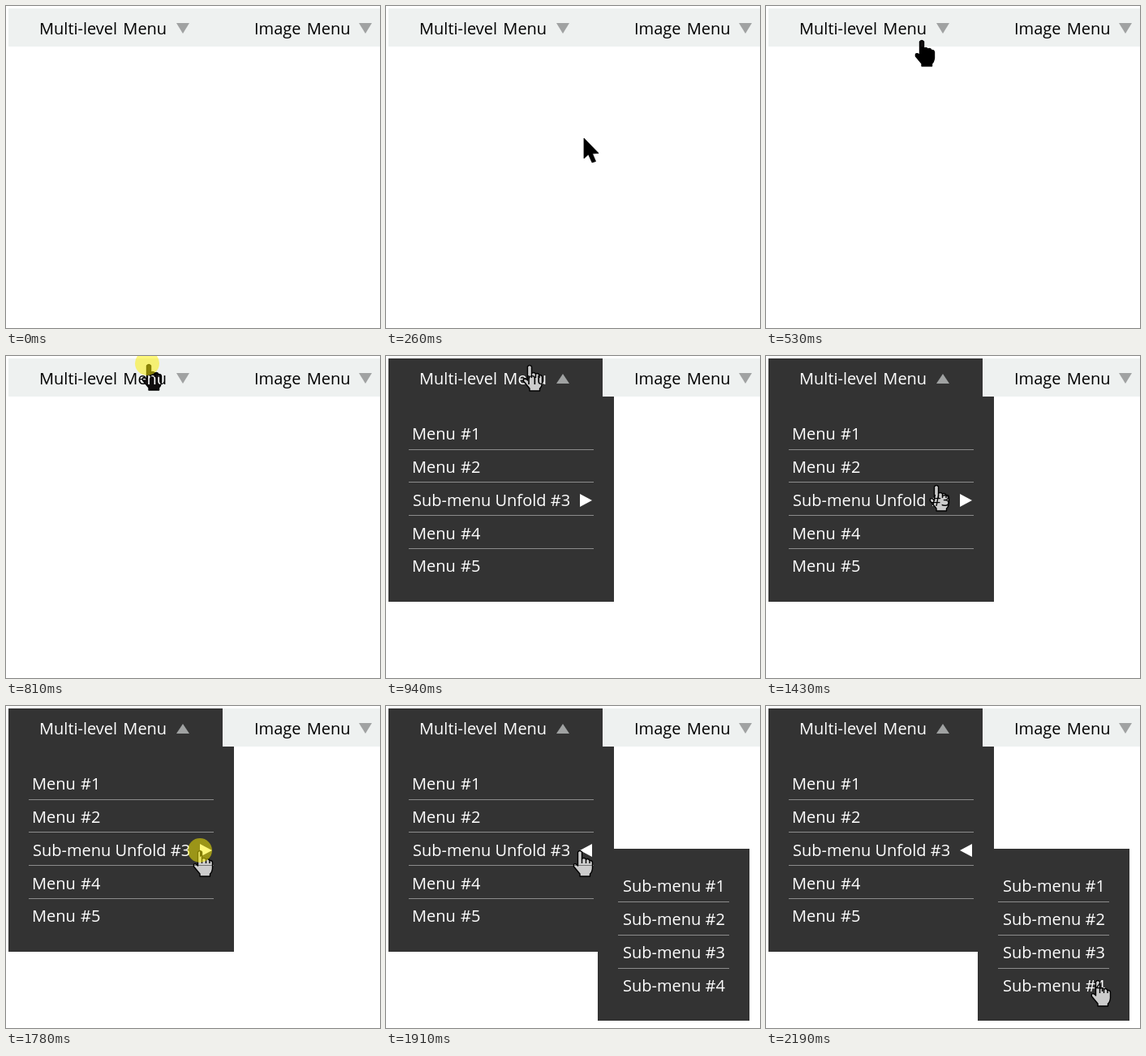
Write an HTML page with a canvas that moves like this. It is 461 px wide and 397 px high and loops after 2.26 s.

```html
<!DOCTYPE html>
<html lang="en">
<head>
<meta charset="utf-8">
<title>Menu demo</title>
<style>
html, body { margin: 0; width: 100%; height: 100%; overflow: hidden; background: #fff; }
canvas { display: block; width: 461px; height: 397px; }
</style>
</head>
<body>
<canvas id="stage" width="461" height="397"></canvas>
<script>
const ctx = document.getElementById('stage').getContext('2d');
const LOOP = 2260;
const DARK = '#333', GREY = '#a0a2a2';
const OPEN_MENU = 940, OPEN_SUB = 1910;

// Screen refresh times: 70 ms apart, with a few exceptions.
const holds = { 0: 120, 260: 60, 810: 130, 1780: 130 };
const ticks = [];
for (let t = 0; t < LOOP; t += holds[t] || 70) ticks.push(t);

// Cursor path: time, x, y.
const path = [
  [120, 282, 256], [260, 244, 163], [390, 211, 85], [600, 182, 20],
  [740, 175, 10], [940, 177, 11], [1010, 181, 21], [1150, 195, 53],
  [1290, 200, 117], [1430, 210, 159], [1570, 225, 172], [1710, 239, 178],
  [1910, 239, 178], [2190, 409, 338]
];

const arrow = new Path2D('M0 0V25L5.5 20L10 30L14.5 28.5L10.5 19L18 18.5Z');
const hand = new Path2D('M-2.5 2Q0 -1 2.5 2V10Q6 8.5 7.5 11Q10.5 9.5 12 12.5Q15 12 15.5 15V22' +
  'Q15 27 12.5 29V32H0V29L-7.5 20Q-8.5 15.5 -4.5 17L-2.5 19Z');
const knuckles = new Path2D('M2.5 10V16M7.5 11V16M12 12.5V16');

function cursorAt(t) {
  const i = path.findIndex(p => p[0] >= t);
  if (i < 0) return path[path.length - 1].slice(1);
  if (i === 0) return path[0].slice(1);
  const [t0, x0, y0] = path[i - 1], [t1, x1, y1] = path[i];
  let k = (t - t0) / (t1 - t0);
  if (t0 >= OPEN_SUB) k = k * k * (3 - 2 * k);
  return [x0 + (x1 - x0) * k, y0 + (y1 - y0) * k];
}

function box(x, y, w, h, color) {
  ctx.fillStyle = color;
  ctx.fillRect(x, y, w, h);
}

function label(text, x, y, color, gap = 0) {
  ctx.font = '20px "Open Sans", "Noto Sans", sans-serif';
  ctx.wordSpacing = gap + 'px';
  ctx.fillStyle = color;
  ctx.fillText(text, x, y);
}

function triangle(color, ...p) {
  ctx.fillStyle = color;
  ctx.beginPath();
  ctx.moveTo(p[0], p[1]);
  ctx.lineTo(p[2], p[3]);
  ctx.lineTo(p[4], p[5]);
  ctx.fill();
}

function drawBar(open) {
  box(3, 3, 458, 47, '#eef1f0');
  if (open) {
    box(3, 3, 264, 47, DARK);
    triangle(GREY, 210, 34, 226, 34, 218, 22);
  } else {
    triangle(GREY, 210, 21, 226, 21, 218, 34);
  }
  triangle(GREY, 435, 21, 451, 21, 443, 34);
  label('Multi-level Menu', 41, 35, open ? '#fff' : '#000', 2);
  label('Image Menu', 306, 35, '#000', 2);
}

function drawMenu(subOpen) {
  box(3, 50, 278, 253, DARK);
  [103, 144, 185, 226, 266].forEach((y, i) => {
    if (i === 2) label('Sub-menu Unfold #3', 33, y, '#fff');
    else label('Menu #' + (i + 1), 32, y, '#fff', 1);
  });
  for (const y of [115, 155, 196, 237]) box(28, y, 228, 1, '#8c8c8c');
  if (subOpen) triangle('#fff', 254, 170, 254, 186, 239, 178);
  else triangle('#fff', 239, 170, 239, 186, 254, 178);
}

function drawSub() {
  box(261, 176, 187, 212, DARK);
  for (let i = 0; i < 4; i++) {
    label('Sub-menu #' + (i + 1), 292, 229 + 41 * i, '#fff');
    if (i < 3) box(286, 241 + 41 * i, 137, 1, '#8c8c8c');
  }
}

// The pointer inverts whatever lies under it.
function drawCursor(x, y, pointing) {
  const shape = pointing ? hand : arrow;
  ctx.save();
  ctx.translate(x, y);
  ctx.globalCompositeOperation = 'difference';
  ctx.fillStyle = '#fff';
  ctx.fill(shape);
  ctx.globalCompositeOperation = 'source-over';
  ctx.strokeStyle = '#000';
  ctx.lineWidth = pointing ? 1.4 : 0.8;
  ctx.lineJoin = 'round';
  ctx.stroke(shape);
  if (pointing) ctx.stroke(knuckles);
  ctx.restore();
}

function drawClick(x, y) {
  ctx.fillStyle = 'rgba(252,240,0,.52)';
  ctx.beginPath();
  ctx.arc(x, y, 15, 0, Math.PI * 2);
  ctx.fill();
}

function draw(t) {
  box(0, 0, 461, 397, '#fff');
  drawBar(t >= OPEN_MENU);
  if (t >= OPEN_MENU) drawMenu(t >= OPEN_SUB);
  if (t >= OPEN_SUB) drawSub();
  if (t < path[0][0]) return;
  const [x, y] = cursorAt(t).map(Math.round);
  drawCursor(x, y, y < 50 || t >= OPEN_MENU);
  if (t === 810) drawClick(174, 9);
  if (t === 1780) drawClick(239, 178);
}

const start = performance.now();
function frame() {
  const now = (performance.now() - start) % LOOP;
  draw(ticks.filter(t => t <= now).pop());
  requestAnimationFrame(frame);
}
frame();
</script>
</body>
</html>
```
